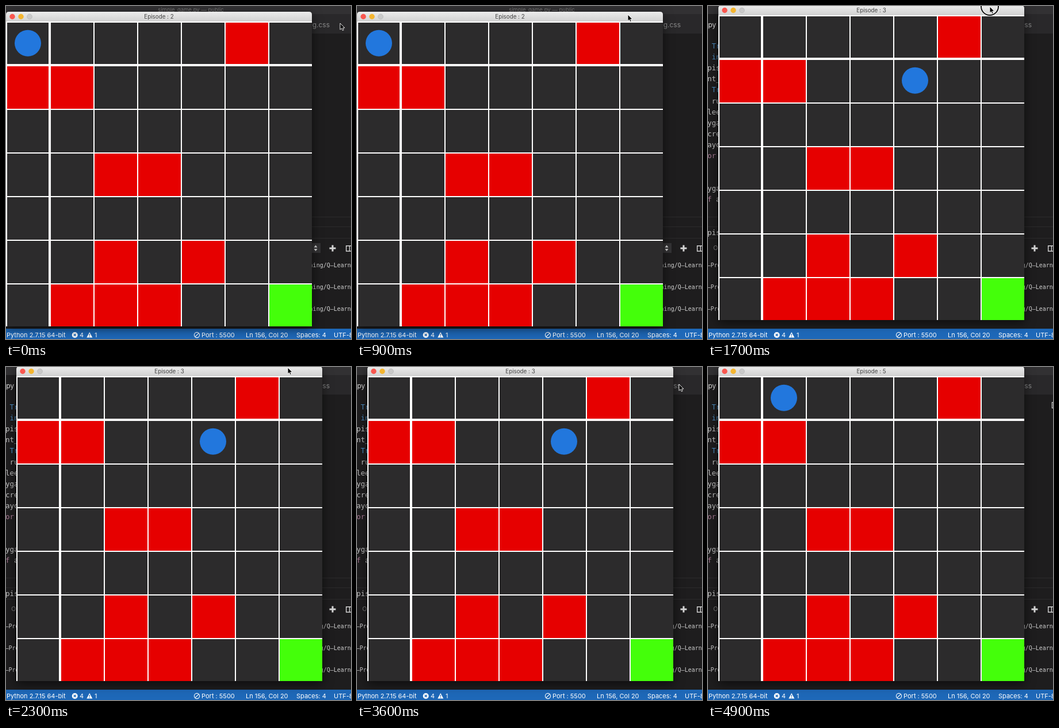
Animation of 600x580 px, one loop 5 s. Source, as an HTML page:

```html
<!DOCTYPE html>
<html lang="en">
<head>
<meta charset="utf-8">
<title>Grid agent</title>
<style>
  html, body { margin: 0; width: 100%; height: 100%; overflow: hidden; background: #1e1d1e; }
  svg { display: block; width: 600px; height: 580px; font-family: Inter, "Open Sans", sans-serif; }
  text { white-space: pre; }
  .mono { font-family: "DejaVu Sans Mono", "Liberation Mono", monospace; }
  #win { filter: drop-shadow(0 5px 9px rgba(0, 0, 0, .55)); }
</style>
</head>
<body>
<svg viewBox="0 0 600 580">
  <defs>
    <linearGradient id="bar" x2="0" y2="1">
      <stop stop-color="#ececec"/><stop offset="1" stop-color="#cfcfcf"/>
    </linearGradient>
  </defs>

  <!-- editor -->
  <rect width="600" height="580" fill="#1e1d1e"/>
  <rect width="600" height="14" fill="#323133"/>
  <rect x="200" y="14" width="400" height="34" fill="#29282a"/>
  <text x="321.5" y="10" font-size="9.5" fill="#777" text-anchor="middle">simple_game.py — public</text>
  <text x="14" y="37" font-size="12" fill="#ddd" text-anchor="end">game.py</text>
  <text x="563" y="37" font-size="12" fill="#8a8a8a" text-anchor="end">ng.css</text>
  <path d="M0 367.5H600M0 384.5H600M0 404.5H600" stroke="#2b2a2b"/>
  <g id="code" class="mono" font-size="12.5"></g>

  <!-- terminal panel -->
  <text x="9" y="425" font-size="11" fill="#777">OUTPUT</text>
  <rect x="440" y="413" width="107" height="17" fill="#343335"/>
  <path d="M535.5 420.5L538.5 416.5 541.5 420.5ZM535.5 423L538.5 427 541.5 423Z" fill="#d4d4d4"/>
  <path d="M562.5 422H573.5M568 416.5V427.5" stroke="#d4d4d4" stroke-width="3"/>
  <path d="M591.7 417.7H604V427H591.7ZM597.5 418V427" fill="none" stroke="#d4d4d4" stroke-width="1.4"/>
  <g id="term" class="mono" font-size="10" fill="#cfcfcf"></g>

  <!-- status bar -->
  <rect y="562" width="600" height="18" fill="#1e68b8"/>
  <g font-size="11" fill="#fff">
    <text x="103.5" y="577" text-anchor="end">Python 2.7.15 64-bit</text>
    <circle cx="119.7" cy="573" r="5"/>
    <path d="M117.7 571L121.7 575M121.7 571L117.7 575" stroke="#1e68b8" stroke-width="1.4"/>
    <text x="128" y="577">4</text>
    <path d="M145.3 568L150.3 577.5H140.3Z"/>
    <path d="M145.3 571V574.3M145.3 575.2V576.4" stroke="#1e68b8" stroke-width="1.2"/>
    <text x="154" y="577">1</text>
    <circle cx="332" cy="573" r="4.6" fill="none" stroke="#fff" stroke-width="1.1"/>
    <path d="M328.8 576.2L335.2 569.8" stroke="#fff" stroke-width="1.1"/>
    <text x="340" y="577">Port : 5500</text>
    <text x="417" y="577">Ln 156, Col 20</text>
    <text x="505" y="577">Spaces: 4</text>
    <text x="570" y="577">UTF-8</text>
  </g>

  <!-- game window -->
  <g id="win">
    <path d="M0 28V15Q0 10 5 10H527Q532 10 532 15V28Z" fill="url(#bar)"/>
    <circle cx="11" cy="18.5" r="4.7" fill="#f9574f"/>
    <circle cx="26" cy="18.5" r="4.7" fill="#f4b52f"/>
    <circle cx="41" cy="18.5" r="4.4" fill="#cacaca" stroke="#b4b4b4" stroke-width=".7"/>
    <text id="title" x="266" y="22.3" font-size="9.8" fill="#444" text-anchor="middle"></text>
    <rect y="27" width="532" height="531" fill="#fff"/>
    <g id="cells" shape-rendering="crispEdges"></g>
    <circle id="ball" r="23" fill="#2277dd"/>
  </g>

  <!-- pointer -->
  <g id="pointer">
    <g id="ring" fill="none">
      <circle r="15" stroke="#fff" stroke-opacity=".75" stroke-width="4"/>
      <circle r="15" stroke="#111" stroke-width="2"/>
    </g>
    <path id="arrow" d="M0 0V11.2L2.6 8.8 4.3 12.6 6.2 11.8 4.6 8.1H8Z" fill="#000" stroke="#fff" stroke-width=".9"/>
    <path id="beam" d="M3 .5H.5V10.5H3" fill="none" stroke="#ddd" stroke-width="1.2"/>
  </g>
</svg>

<script>
const $ = id => document.getElementById(id);

function add(parent, tag, attrs, text = '') {
  const el = document.createElementNS('http://www.w3.org/2000/svg', tag);
  for (const k in attrs) el.setAttribute(k, attrs[k]);
  el.textContent = text;
  parent.append(el);
}

// Visible line starts of the code behind the window: [row, text, colour]
const BLUE = '#4e8fc4', PINK = '#a87a94', LIGHT = '#c4c4c4';
const code = [
  [0, ' Tr', BLUE], [1, ' in', BLUE], [2, 'pis', LIGHT], [3, 'nt_', LIGHT],
  [4, ' Tr', BLUE], [5, ' ru', LIGHT], [6, 'lee', LIGHT], [7, 'yga', LIGHT],
  [8, 'cre', LIGHT], [9, 'ayo', LIGHT], [10, 'or', PINK], [13, 'yga', LIGHT],
  [14, 'f', PINK], [14, '  a', LIGHT], [17, 'pis', LIGHT]
];
for (const [row, text, fill] of code)
  add($('code'), 'text', { x: -1, y: 74 + row * 19.1, fill }, text);

for (const y of [454.5, 492.8, 531]) {
  add($('term'), 'text', { x: -1.5, y }, '–Project');
  add($('term'), 'text', { x: 527.6, y }, 'ning/Q–Learn');
}

// Board: r = trap, g = goal
const board = ['.....r.', 'rr.....', '.......', '..rr...', '.......', '..r.r..', '.rrr..g'];
const fills = { '.': '#2c2b2c', r: '#e60000', g: '#44ff0a' };
board.forEach((line, row) => [...line].forEach((kind, col) => {
  const x = 2 + col * 76, y = 29 + row * 76;
  add($('cells'), 'rect', {
    x, y, fill: fills[kind],
    width: col ? 74 : 72,
    height: row ? Math.min(74, 558 - y) : 72
  });
}));

// One move per tick; S starts the next episode
const LOOP = 5000, TICK = 100;
const moves = 'RRRLRLLL.' + 'RDS' + 'RRRRD' + 'RRDLULULDRR.LD' + 'DRULULURRS' + 'RRRLLDSR';
const dirs = { R: [1, 0], L: [-1, 0], D: [0, 1], U: [0, -1], '.': [0, 0] };
const states = [{ col: 0, row: 0, ep: 2 }];
for (const m of moves) {
  const { col, row, ep } = states[states.length - 1];
  states.push(m === 'S'
    ? { col: 0, row: 0, ep: ep + 1 }
    : { col: col + dirs[m][0], row: row + dirs[m][1], ep });
}

// Keys: [ms, x, y]
const windowPath = [[0, 0, 0], [1200, 0, 0], [1300, 2, -1], [1700, 18, -11]];
const pointerPath = [
  [0, 581, 30], [600, 480, 17], [900, 471, 15], [1200, 474, 17], [1300, 476, 17],
  [1700, 490, 1], [3300, 490, 1], [3600, 560, 30], [3900, 598, 61]
];

function along(path, t) {
  const i = path.findIndex(key => key[0] > t);
  if (i < 0) return path[path.length - 1].slice(1);
  const [t0, x0, y0] = path[i - 1], [t1, x1, y1] = path[i];
  const k = (t - t0) / (t1 - t0);
  return [x0 + (x1 - x0) * k, y0 + (y1 - y0) * k];
}

const place = (id, [x, y]) => $(id).setAttribute('transform', `translate(${x} ${y})`);
const show = (id, on) => $(id).setAttribute('visibility', on ? 'visible' : 'hidden');

function draw(time) {
  const tick = Math.floor((time % LOOP) / TICK), t = tick * TICK;
  const { col, row, ep } = states[tick];
  place('ball', [38 + col * 76, 64.8 + row * 76]);
  $('title').textContent = `Episode : ${ep}`;
  place('win', along(windowPath, t));
  place('pointer', along(pointerPath, t));
  show('ring', t >= 1200 && t < 2000);
  show('arrow', t < 3900);
  show('beam', t >= 3900);
}

const start = performance.now();
function loop() {
  draw(performance.now() - start);
  requestAnimationFrame(loop);
}
loop();
</script>
</body>
</html>
```
